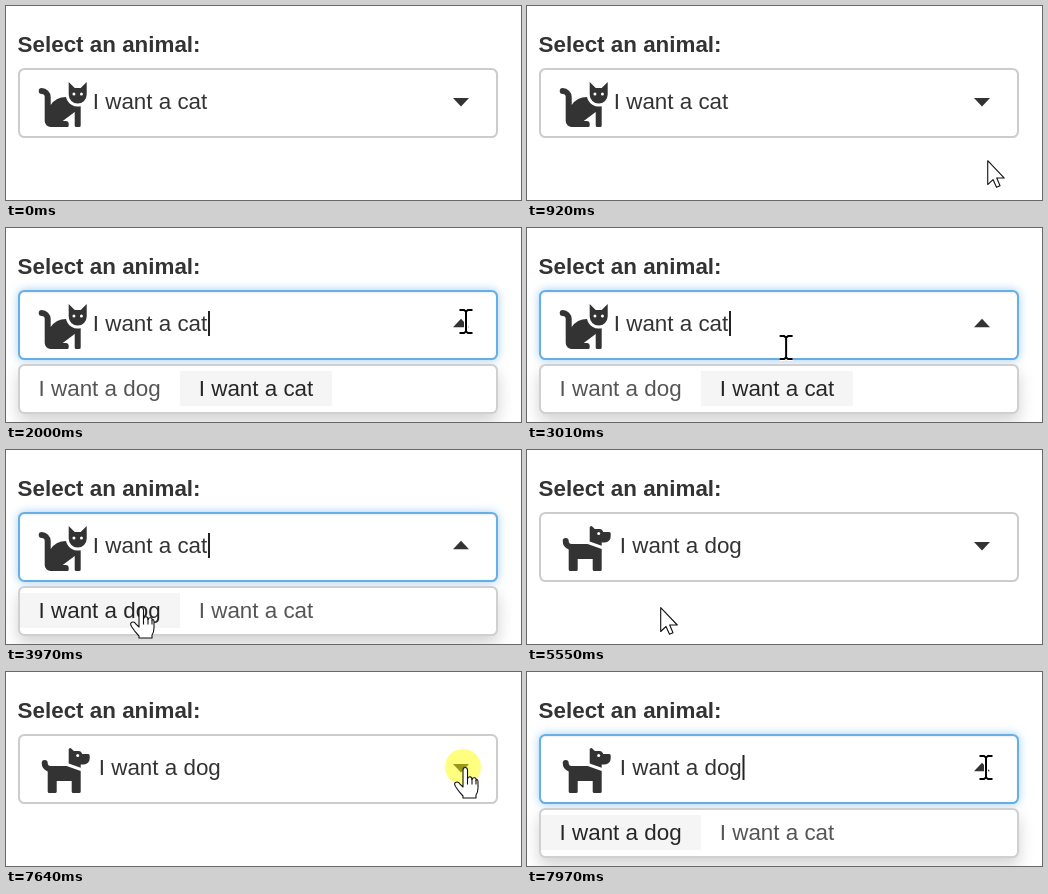
Recreate the animation shown at these times as an HTML page. Size 515 px wide and 194 px high, loop 8000 ms.

```html
<!DOCTYPE html>
<html lang="en">
<head>
<meta charset="utf-8">
<title>Select an animal</title>
<style>
html, body { margin: 0; width: 100%; height: 100%; overflow: hidden; background: #fff; }
div, svg { position: absolute; box-sizing: border-box; }
#box, #menu { left: 12px; width: 480px; border: 2px solid #ccc; border-radius: 6.4px; background: #fff; }
#box { top: 62px; height: 70px; }
#box.open { border-color: #66afe9; box-shadow: inset 0 1px 2px rgba(0,0,0,.075), 0 0 10px rgba(102,175,233,.6); }
#menu { top: 136px; height: 50px; border-color: #d0d0d0; box-shadow: 0 8px 16px rgba(0,0,0,.175); }
svg { left: 0; top: 0; }
text { font: 22.4px "Liberation Sans", Arial, sans-serif; fill: #333; }
.head { font-weight: bold; }
.item rect { fill: none; }
.item text { fill: #555; }
.item.on rect { fill: #f5f5f5; }
.item.on text { fill: #262626; }
.icon, #tri { fill: #333; }
.line { fill: #fff; stroke: #111; stroke-width: 1.1; stroke-linejoin: round; }
</style>
</head>
<body>
<div id="box"></div>
<div id="menu"></div>
<svg width="515" height="194" viewBox="0 0 515 194">
  <text class="head" x="11.6" y="46">Select an animal:</text>
  <g id="cat">
    <g class="icon" transform="translate(32.7 73) scale(1.5)">
      <path d="M8 17.4Q11.5 12 18.2 12A8 8 0 0 0 28 18.1V31a1 1 0 0 1-1 1h-2a1 1 0 0 1-1-1V22l-8 6h2a2 2 0 0 1 2 2v1a1 1 0 0 1-1 1H8a4 4 0 0 1-4-4V12a2 2 0 0 0-2-2 2 2 0 0 1 0-4 6 6 0 0 1 6 6Z"/>
      <path d="M28 6h-4L20 2v8.4a6 6 0 0 0 12 0V2Z"/>
      <g fill="#fff"><circle cx="23.5" cy="10" r="1"/><circle cx="28.5" cy="10" r="1"/></g>
    </g>
    <text x="86.8" y="103">I want a cat</text>
  </g>
  <g id="dog">
    <g class="icon" transform="translate(32.7 73) scale(1.5)">
      <path d="M18.6 14 28 17.3V31a1 1 0 0 1-1 1h-4a1 1 0 0 1-1-1v-7H12v7a1 1 0 0 1-1 1H7a1 1 0 0 1-1-1V17.6A6 6 0 0 1 2 12a2 2 0 0 1 4 0 2 2 0 0 0 2 2Z"/>
      <path d="M34 7v2a4 4 0 0 1-4 4h-2v2.2l-8-2.8V3a1 1 0 0 1 1.7-.7L23.4 4h3.4a2 2 0 0 1 1.8 1.1L29 6h4a1 1 0 0 1 1 1Z"/>
      <circle cx="26" cy="7" r="1" fill="#fff"/>
    </g>
    <text x="92.8" y="103">I want a dog</text>
  </g>
  <rect id="caret" y="83" width="2" height="25" fill="#222"/>
  <path id="tri" d="M-8-4H8L0 4.5Z"/>
  <g id="items">
    <g class="item" id="dogItem"><rect x="14" y="143" width="160" height="35"/><text x="32.6" y="168">I want a dog</text></g>
    <g class="item" id="catItem"><rect x="174" y="143" width="152" height="35"/><text x="192.8" y="168">I want a cat</text></g>
  </g>
  <g id="mouse">
    <circle id="spot" r="18" fill="#ff0" fill-opacity=".5"/>
    <path id="arrow" class="line" d="M.7.7V24.5L6 19.5 9.5 27.3 13 25.8 9.7 18H17.3Z"/>
    <g id="hand" class="line" transform="translate(1)">
      <path d="M-1 20V3Q-1 .5 1.2.5T3.5 3V12Q4 9.5 6 9.7T8 12.5Q8.5 10.5 10.5 10.7T12 13.2Q14 11.5 14 15V21Q14 25 12 28V31H-1V29Q-5 25-8.5 19.5-10.5 16-8 15.2T-4 17.2Z"/>
      <path fill="none" d="M3.5 11.5V17.5M8 12V17.5M12 13V17.5"/>
    </g>
    <g id="beam" transform="translate(2 1)" fill="none" stroke-width="2">
      <path id="bar" d="M-6.5-12H-2L0-10.5 2-12H6.5M0-10.5V9.5M-6.5 11H-2L0 9.5 2 11H6.5"/>
    </g>
  </g>
</svg>
<script>
const $ = id => document.getElementById(id);
const show = (id, on) => { $(id).style.display = on ? '' : 'none'; };
const within = (v, a, b) => v >= a && v < b;

// Black stroke over a white halo
const bar = $('bar'), halo = bar.cloneNode();
halo.removeAttribute('id');
halo.setAttribute('stroke', '#fff');
halo.setAttribute('stroke-width', 4);
bar.setAttribute('stroke', '#000');
bar.before(halo);

const LOOP = 8000, STEP = 70, BLINK = 530, ENTER = 500, PICK = 4230;
const clicks = [1730, PICK, 7640];

// Pointer moves: start, duration, end point
const moves = [
  [ENTER, 770, 457, 89], [1330, 70, 458, 93],
  [2660, 600, 136, 160], [3270, 700, 133, 157],
  [5550, 770, 451, 100], [6320, 200, 457, 97], [6520, 330, 457, 95]
];

function pointer(t) {
  let x = 464, y = 185;
  for (const [start, time, toX, toY] of moves) {
    const tick = Math.floor((t - start) / STEP) * STEP;
    const u = Math.min(1, Math.max(0, tick / time));
    const s = u * u * (3 - 2 * u);
    x += (toX - x) * s;
    y += (toY - y) * s * s;
  }
  return [x, y];
}

function draw(t) {
  const isDog = t >= PICK;
  const openAt = (isDog ? clicks[2] : clicks[0]) + STEP;
  const open = t >= openAt;
  const [x, y] = pointer(t);

  $('box').className = open ? 'open' : '';
  show('menu', open);
  show('items', open);
  show('cat', !isDog);
  show('dog', isDog);
  show('caret', open && Math.floor((t - openAt) / BLINK) % 2 === 0);
  $('caret').setAttribute('x', isDog ? 215.5 : 202);
  $('tri').setAttribute('transform', `translate(455 ${open ? 95.3 : 96}) scale(1 ${open ? -1 : 1})`);

  const dogOn = isDog || (y > 143 && x < 174);
  $('dogItem').classList.toggle('on', dogOn);
  $('catItem').classList.toggle('on', !dogOn);

  const overBox = within(y, 62, 132), overMenu = open && y >= 136;
  const kind = open && overBox ? 'beam' : overBox || overMenu ? 'hand' : 'arrow';
  show('mouse', t >= ENTER);
  $('mouse').setAttribute('transform', `translate(${x} ${y})`);
  for (const k of ['arrow', 'hand', 'beam']) show(k, k === kind);
  show('spot', clicks.some(c => within(t, c, c + 265)));
}

const begin = performance.now();
function frame() {
  draw((performance.now() - begin) % LOOP);
  requestAnimationFrame(frame);
}
frame();
</script>
</body>
</html>
```
